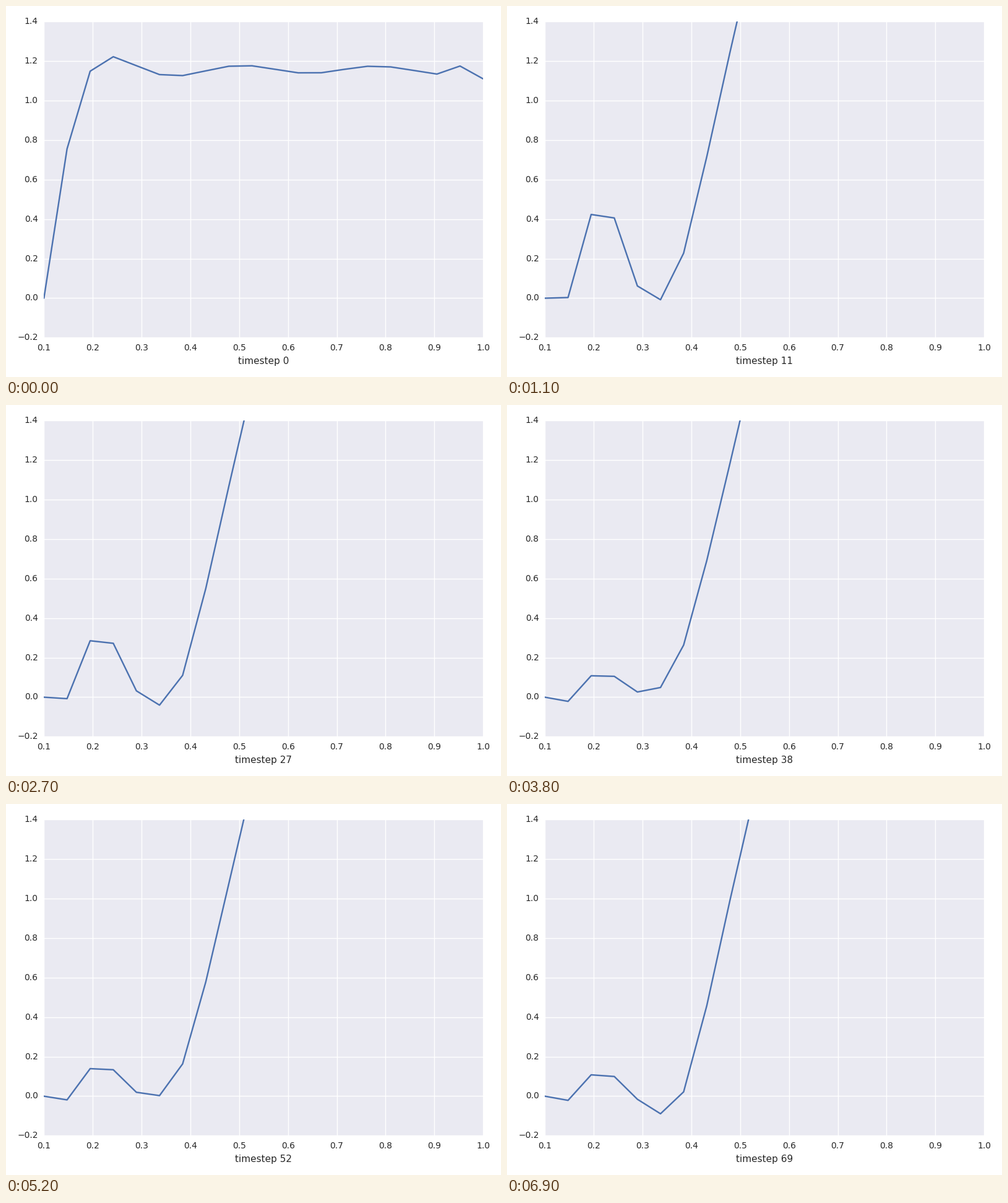
Write a matplotlib script that moves like this. It is 800 by 600 pixels and loops after 7000 ms.

```python
import numpy as np
import matplotlib.pyplot as plt
from matplotlib.animation import FuncAnimation

W, H, DPI = 800, 600, 100
STEPS, INTERVAL = 70, 100
INK, PANEL, BLUE = "#262626", "#EAEAF2", "#4C72B0"

plt.rcParams.update({"font.family": "DejaVu Sans", "font.size": 10,
                     "text.color": INK, "axes.labelcolor": INK,
                     "axes.axisbelow": True, "ytick.alignment": "center"})

POINTS = 20
SETTLE = 11   # timestep by which the plateau has turned into the ramp
TAU = 2.0     # decay time of the plateau, in timesteps

# timestep, height of the left bump, depth of the dip, foot of the ramp
KEYS = np.array([
    (SETTLE, .43, .09, 5.50),
    (27, .29, .09, 5.85),
    (38, .11, .00, 5.64),
    (46, .10, .00, 5.58),
    (59, .19, .08, 6.15),
    (69, .11, .14, 6.00),
])

i = np.arange(POINTS)


def plateau():
    """A rounded step with a fading ripple and a flick at the right end."""
    ripple = (.018 + .058 * np.exp((3 - i) / 2)) * np.cos(2 * np.pi * (i - 2.95) / 5.7)
    rise = -.881 * np.exp(-1.06 * i ** 1.3)
    k = POINTS - 1 - i
    flick = -.054 * (-1.0) ** k * np.exp(-.6 * k ** 2)
    return 1.157 + ripple + rise + flick


def ramp(step):
    """A soft-footed ramp with a bump on the left and a dip before the climb."""
    bump, dip, foot = (np.interp(step, KEYS[:, 0], col) for col in KEYS.T[1:])
    soft = .45
    climb = .5 * soft * np.logaddexp(0, (i - foot) / soft)
    hump = bump * (1.2 - .08 * i) * np.exp(-((i - 2.6) / 1.25) ** 4)
    valley = dip * np.exp(-((i - 5.7) / 1.5) ** 2)
    undershoot = .03 * np.exp(-4 * (i - 1) ** 2)
    return climb + hump - valley - undershoot


def curve(step):
    keep = max(0, np.exp(-step / TAU) - np.exp(-SETTLE / TAU)) / (1 - np.exp(-SETTLE / TAU))
    return keep * plateau() + (1 - keep) * ramp(step)


fig = plt.figure(figsize=(W / DPI, H / DPI), dpi=DPI, facecolor="white")
left, right, top, bottom = 61.3, 771.15, 25.28, 536.26
ax = fig.add_axes([left / W, 1 - bottom / H, (right - left) / W, (bottom - top) / H],
                  facecolor=PANEL)
ax.set_xlim(0.1, 1.0)
ax.set_ylim(-0.2, 1.4)
ax.set_xticks(np.arange(1, 11) / 10)
ax.set_yticks(np.arange(-1, 8) / 5)
ax.grid(True, color="white", linewidth=1, linestyle="-")
ax.tick_params(length=0, pad=7, labelsize=10, labelcolor=INK)
for spine in ax.spines.values():
    spine.set_visible(False)

line, = ax.plot(np.linspace(0.1, 1.0, POINTS), curve(0), color=BLUE,
                linewidth=1.75, solid_capstyle="round")
label = ax.set_xlabel("timestep 0", fontsize=11, labelpad=5)


def draw(step):
    line.set_ydata(curve(step))
    label.set_text(f"timestep {step}")
    return line, label


anim = FuncAnimation(fig, draw, frames=STEPS, interval=INTERVAL,
                     repeat=True, repeat_delay=0, blit=False)
plt.show()
```
